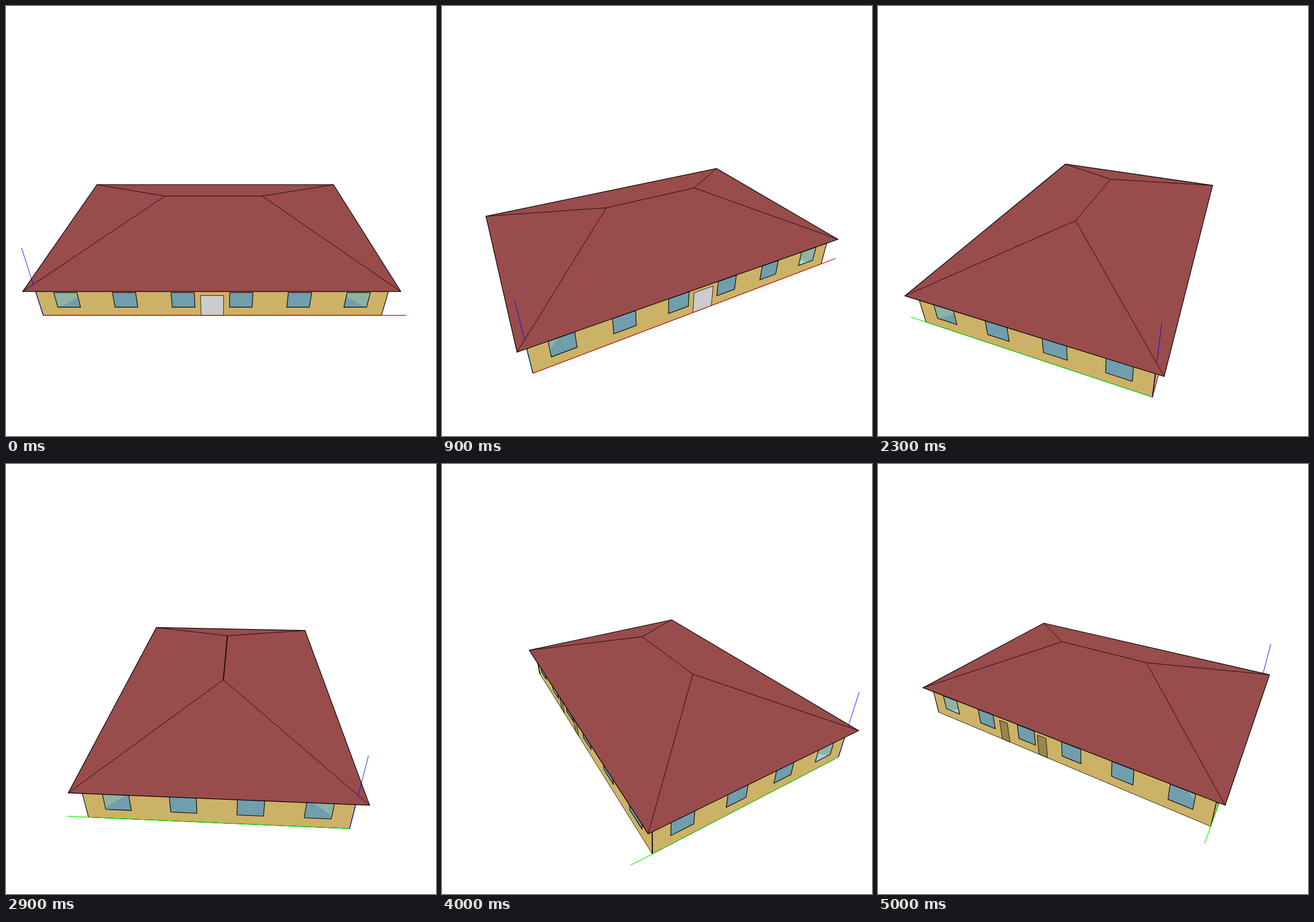
Recreate the animation shown at these times as an HTML page with a canvas. Size 748 px wide and 748 px high, loop 5.1 s.

```html
<!DOCTYPE html>
<html lang="en">
<head>
<meta charset="utf-8">
<title>Rotating house</title>
<style>
  html, body { margin: 0; width: 100%; height: 100%; overflow: hidden; background: #fff; }
  canvas { display: block; }
</style>
</head>
<body>
<canvas width="748" height="748"></canvas>
<script>
const ctx = document.querySelector('canvas').getContext('2d');
const SIZE = 748, FRAMES = 51, FRAME_MS = 100, STEP = 3 * Math.PI / 180;

// House dimensions in metres
const LEN = 27.69, DEPTH = 18.46, HEIGHT = 3.05, OVERHANG = 0.6, RIDGE = 6.327;
const BAY = 4.615, WINDOW = 1.83, SILL = 0.9, LINTEL = 2.424, ZONE = 5;
const AXIS = { x: 29.7, y: 20.01, z: 6.644 };

// Camera orbits the centre of the scene, 30 degrees above it, with a 60 degree view
const TARGET = [14.552, 9.707, 3.322], DIST = 37.24;
const SIN = 0.5, COS = Math.sqrt(3) / 2, FOCAL = SIZE / 2 * Math.sqrt(3);

const COLOR = {
  wall: '#ccb266', roof: '#994c4c', door: '#99854c', entrance: '#cccccc',
  floorGlass: '#709ead', wallGlass: '#8fb2a3', emptyGlass: '#a3d1e0'
};

const walls = [
  { at: (u, z) => [u, 0, z], len: LEN, faces: (x, y) => y < 0, floor: [16.6, 2, 0],
    doors: [[12.93, 14.76, COLOR.entrance]] },
  { at: (u, z) => [0, u, z], len: DEPTH, faces: x => x < 0, floor: [2, 11.08, 0],
    doors: [] },
  { at: (u, z) => [u, DEPTH, z], len: LEN, faces: (x, y) => y > DEPTH, floor: [16.6, 16.46, 0],
    doors: [[14.02, 14.94, COLOR.door], [18.23, 19.14, COLOR.door]] }
];

// Diagonal inner walls running from each corner
const partitions = [[0, 0], [LEN, 0], [LEN, DEPTH], [0, DEPTH]].map(([x, y]) => {
  const ix = x ? x - ZONE : ZONE, iy = y ? y - ZONE : ZONE;
  return [[x, y, 0], [ix, iy, 0], [ix, iy, HEIGHT], [x, y, HEIGHT]];
});

const eaves = [
  [-OVERHANG, -OVERHANG, HEIGHT], [LEN + OVERHANG, -OVERHANG, HEIGHT],
  [LEN + OVERHANG, DEPTH + OVERHANG, HEIGHT], [-OVERHANG, DEPTH + OVERHANG, HEIGHT]
];
const ridge = [[DEPTH / 2, DEPTH / 2, RIDGE], [LEN - DEPTH / 2, DEPTH / 2, RIDGE]];

let sinA, cosA;

function project([px, py, pz]) {
  const x = px - TARGET[0], y = py - TARGET[1], z = pz - TARGET[2];
  const side = x * cosA - y * sinA, ahead = x * sinA + y * cosA;
  const depth = DIST + ahead * COS - z * SIN;
  return [
    SIZE / 2 + FOCAL * side / depth,
    SIZE / 2 - FOCAL * (ahead * SIN + z * COS) / depth,
    depth
  ];
}

function trace(points, close) {
  ctx.beginPath();
  for (const p of points) ctx.lineTo(...project(p).slice(0, 2));
  if (close) ctx.closePath();
}

function fill(points, color) {
  trace(points, true);
  ctx.fillStyle = color;
  ctx.fill();
}

function outline(points, width = 0.9) {
  trace(points, true);
  ctx.strokeStyle = '#000';
  ctx.lineWidth = width;
  ctx.stroke();
}

function line(a, b, color, width = 0.9) {
  trace([a, b]);
  ctx.strokeStyle = color;
  ctx.lineWidth = width;
  ctx.stroke();
}

// Nearly upright edges come out heavier
function edge(a, b) {
  const [x1, y1] = project(a), [x2, y2] = project(b);
  line(a, b, '#000', Math.abs(x2 - x1) < 0.23 * Math.abs(y2 - y1) ? 1.5 : 0.8);
}

const panel = (wall, u1, u2, z1, z2) =>
  [wall.at(u1, z1), wall.at(u2, z1), wall.at(u2, z2), wall.at(u1, z2)];

function drawWindow(wall, mid) {
  const pane = panel(wall, mid - WINDOW / 2, mid + WINDOW / 2, SILL, LINTEL);
  const center = wall.at(mid, (SILL + LINTEL) / 2);
  // The floor only shows through panes that are nearer than its middle
  const floorShows = project(center)[2] < project(wall.floor)[2];
  ctx.save();
  trace(pane, true);
  ctx.clip();
  fill(pane, floorShows ? COLOR.floorGlass : COLOR.emptyGlass);
  for (const p of partitions) fill(p, COLOR.wallGlass);
  ctx.restore();
  outline(pane, 1.1);
}

function drawWall(wall) {
  const face = panel(wall, 0, wall.len, 0, HEIGHT);
  fill(face, COLOR.wall);
  outline(face, 0.8);
  edge(face[0], face[3]);
  edge(face[1], face[2]);
  for (let mid = BAY / 2; mid < wall.len; mid += BAY) drawWindow(wall, mid);
  for (const [u1, u2, color] of wall.doors) {
    const door = panel(wall, u1, u2, 0, 2.13);
    fill(door, color);
    outline(door, 0.8);
  }
}

function drawRoof() {
  fill(eaves, COLOR.roof);
  outline(eaves, 1.2);
  edge(...ridge);
  eaves.forEach((corner, i) => edge(corner, ridge[i === 1 || i === 2 ? 1 : 0]));
}

function draw(angle) {
  sinA = Math.sin(angle);
  cosA = Math.cos(angle);
  const camX = TARGET[0] - DIST * COS * sinA, camY = TARGET[1] - DIST * COS * cosA;
  const origin = [0, 0, 0];
  const xAxis = () => line(origin, [AXIS.x, 0, 0], '#f00');
  const yAxis = () => line(origin, [0, AXIS.y, 0], '#0f0');

  ctx.fillStyle = '#fff';
  ctx.fillRect(0, 0, SIZE, SIZE);
  xAxis();
  yAxis();
  for (const wall of walls) if (wall.faces(camX, camY)) drawWall(wall);
  if (walls[0].faces(camX, camY)) xAxis();
  if (walls[1].faces(camX, camY)) yAxis();
  line(origin, [0, 0, HEIGHT], '#00f');
  drawRoof();
  line([0, 0, HEIGHT + OVERHANG / 3], [0, 0, AXIS.z], '#00f');
}

const start = performance.now();
function tick() {
  const frame = Math.floor((performance.now() - start) / FRAME_MS) % FRAMES;
  draw(frame * STEP);
  requestAnimationFrame(tick);
}
tick();
</script>
</body>
</html>
```
